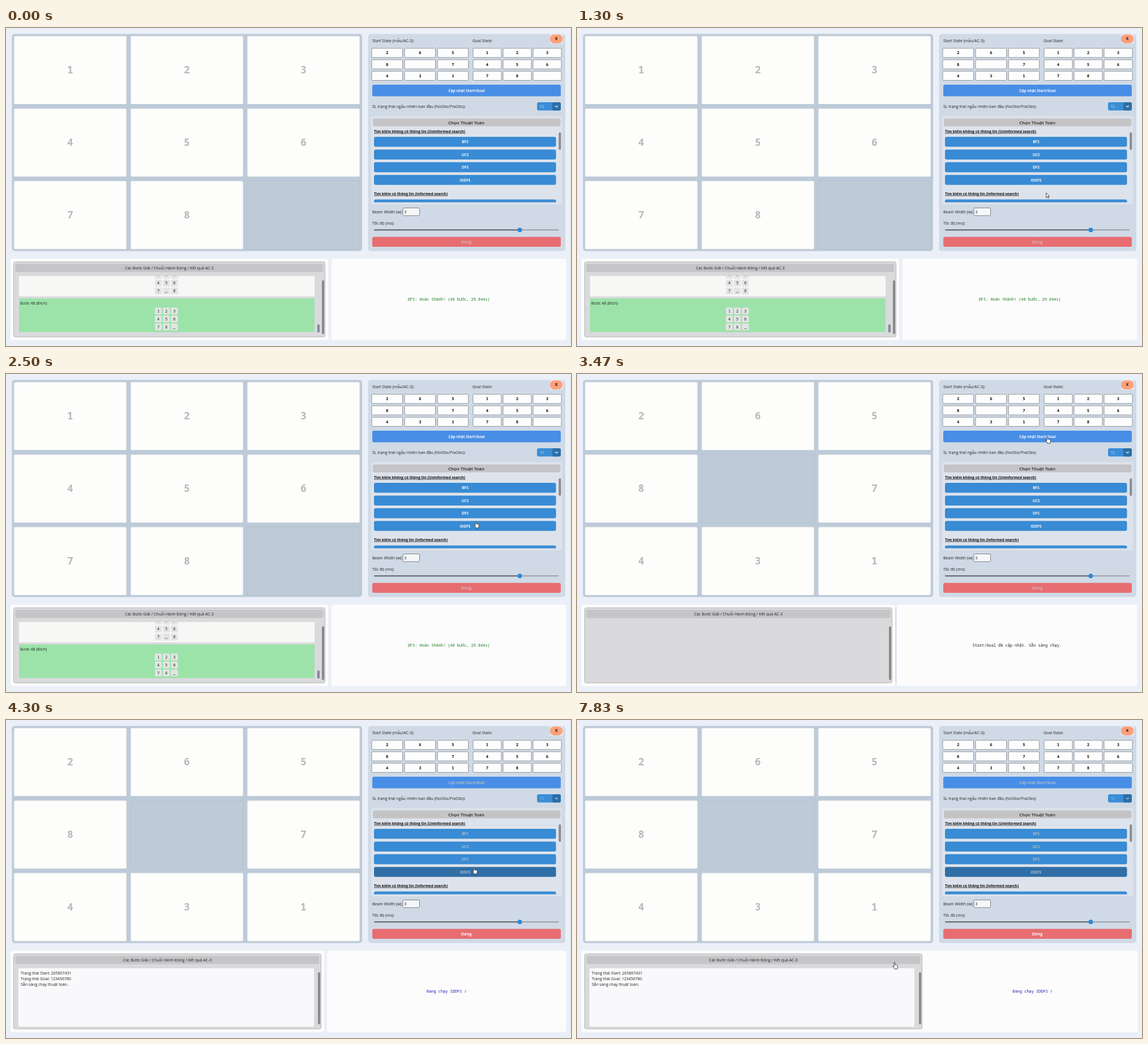
Write an HTML page that moves like this. It is 998 by 561 pixels and loops after 8000 ms.

```html
<!DOCTYPE html>
<html lang="vi">
<head>
<meta charset="utf-8">
<title>8-puzzle</title>
<style>
  html, body { margin: 0; width: 100%; height: 100%; overflow: hidden; background: #ebf0f8; }
  svg { display: block; width: 100vw; height: 100vh; }
  text { font-family: "Open Sans", "Noto Sans", sans-serif; white-space: pre; }
  .mono { font-family: "Noto Sans Mono", "DejaVu Sans Mono", monospace; }
</style>
</head>
<body>
<svg id="stage" viewBox="0 0 998 561"></svg>
<script>
const LOOP = 8000;
const stage = document.getElementById('stage');

function add(parent, tag, attrs, content) {
  const el = document.createElementNS('http://www.w3.org/2000/svg', tag);
  for (const k in attrs) el.setAttribute(k, attrs[k]);
  if (content !== undefined) el.textContent = content;
  return parent.appendChild(el);
}
const group = (parent = stage) => add(parent, 'g', {});

// Rectangle from its left, top, right and bottom edges
const box = (g, l, t, r, b, fill, rx = 0, stroke = 'none') =>
  add(g, 'rect', { x: l, y: t, width: r - l, height: b - t, fill, rx, stroke });

// Text whose capitals are centred on y
const text = (g, s, x, y, size = 7, more = {}) =>
  add(g, 'text', { x, y: y + size * 0.357, 'font-size': size, fill: '#222', ...more }, s);
const MID = { 'text-anchor': 'middle' };
const BOLD = { 'font-weight': 700 };
const MONO = { class: 'mono' };

function board(digits) {
  const g = group();
  [...digits].forEach((d, i) => {
    const x = 14 + i % 3 * 206, y = 14 + Math.floor(i / 3) * 127.9;
    const blank = d === '0';
    box(g, x, y, x + 199, y + 120.5, blank ? '#becbd7' : '#fdfdfc', 2, blank ? '#b5c3cb' : '#c9d0d5');
    if (!blank) text(g, d, x + 99.5, y + 60, 18, { ...MID, ...BOLD, ...MONO, fill: '#b9b9b9' });
  });
  return g;
}

function inputs(digits, left, pitch, width) {
  [...digits].forEach((d, i) => {
    const x = left + i % 3 * pitch, y = 35.8 + Math.floor(i / 3) * 20.2;
    box(stage, x, y, x + width, y + 16.2, '#fdfdfd', 1, '#8d949b');
    if (d !== '0') text(stage, d, x + width / 2, y + 8, 7.3, { ...MID, ...BOLD, ...MONO, fill: '#111' });
  });
}

function miniGrid(g, rows, top) {
  rows.forEach((row, r) => [...row].forEach((d, c) => {
    const x = 269 + c * 14.2, y = top + r * 14;
    box(g, x - 6, y - 6, x + 6, y + 6, '#e3e4e5', 1);
    text(g, d, x, y, 7, { ...MID, ...MONO });
  }));
}

// Lower area: results frame ending at `edge`, status card from `cardX`
function lower(edge, cardX, cardEnd, barEnd, status, color) {
  const g = group();
  box(g, 8, 407, edge + 5, 550.5, '#fcfcfc', 3);
  box(g, cardX, 407, cardEnd, 550.5, '#fcfcfc', 3);
  box(g, 13.5, 412.5, edge - .5, 545, '#dadadc', 3, '#b6b6ba');
  box(g, 16.5, 416, edge - 3.5, 430.5, '#c5c5c8', 3);
  text(g, 'Các Bước Giải / Chuỗi Hành Động / Kết quả AC-3', (13 + edge) / 2, 423.3, 7, MID);
  box(g, edge - 6, 445, edge - 2, barEnd, '#888', 2);
  text(g, status, (cardX + cardEnd) / 2, 478.6, 6.92, { ...MID, ...MONO, fill: color });
  return g;
}

function log(g, right) {
  box(g, 22, 438, right, 541, '#f9f9fb', 2);
  ['Trạng thái Start: 265807431', 'Trạng thái Goal: 123456780', 'Sẵn sàng chạy thuật toán.']
    .forEach((s, i) => text(g, s, 26, 446.5 + i * 9.8));
}

// Board
box(stage, 10.5, 10.5, 629, 393.5, '#bccad9', 5);
const solved = board('123456780');
const shuffled = board('265807431');

// Control panel
box(stage, 639.5, 10.5, 988, 393.5, '#d0dae6', 5);
text(stage, 'Start State (mẫu/AC-3):', 647, 23);
text(stage, 'Goal State:', 824, 23);
box(stage, 961, 11, 983.5, 27.5, '#e6ebf1', 1);
box(stage, 961, 11.5, 983, 27, '#ffa079', 7);
text(stage, 'X', 972, 19, 7, { ...MID, ...BOLD, fill: '#111' });
inputs('265807431', 646, 58.1, 54.5);
inputs('123456780', 825, 53, 50);

const labels = [];
const label = (s, x, y) => labels.push(text(stage, s, x, y, 6.5, { ...MID, ...BOLD }));

box(stage, 647, 100, 980, 120.5, '#488ee6', 3);
label('Cập nhật Start/Goal', 813.5, 110.3);
text(stage, 'SL trạng thái ngẫu nhiên ban đầu (NoObs/PraObs):', 647, 138.3);
box(stage, 938, 131, 980, 145.5, '#3a8dd6', 3);
box(stage, 965, 131, 980, 145.5, '#2d6ea6', 3);
const count = text(stage, '10', 942, 138.3);
const chevron = add(stage, 'path', { d: 'M970 137.3l2.5 2.2 2.5-2.2', fill: 'none', 'stroke-width': 1.2 });

box(stage, 645, 155.5, 982, 311, '#dde3ec', 4);
box(stage, 648, 159.5, 979.5, 173.5, '#c4c4c7', 3);
text(stage, 'Chọn Thuật Toán', 813, 166.8, 7.8, { ...MID, 'font-weight': 600 });
const HEAD = { ...BOLD, fill: '#111', 'text-decoration': 'underline' };
text(stage, 'Tìm kiếm không có thông tin (Uninformed search)', 650, 182.3, 6.5, HEAD);
let picked;
['BFS', 'UCS', 'DFS', 'IDDFS'].forEach((s, i) => {
  const y = 192 + i * 22.4;
  picked = box(stage, 650, y, 971.5, y + 17.6, '#388bd4', 3);
  label(s, 811, y + 9);
});
text(stage, 'Tìm kiếm có thông tin (Informed search)', 650, 292.3, 6.5, HEAD);
add(stage, 'path', { d: 'M650 307.5v-2q0-3 3-3h315.500q3 0 3 3v2z', fill: '#388bd4' });
box(stage, 976.3, 184, 980.3, 215, '#8a8a8c', 2);

text(stage, 'Beam Width (w):', 647, 324.2);
box(stage, 701, 317.5, 730.5, 331, '#f5f7f9', 1.5, '#7d8287');
text(stage, '3', 703.5, 324.2);
text(stage, 'Tốc độ (ms):', 647, 345);
box(stage, 650, 355.2, 976.5, 357.2, '#9aa0a8', 1);
box(stage, 650, 355.2, 907, 357.2, '#666a6e', 1);
add(stage, 'circle', { cx: 907.5, cy: 356.3, r: 4, fill: '#2f87d2' });
box(stage, 647, 368.5, 980, 386, '#e76d71', 3);
const stop = text(stage, 'Dừng', 813, 377.4, 6.8, { ...MID, ...BOLD });

// Lower area in its successive states
const done = lower(564, 575, 989.5, 540, 'DFS: Hoàn thành! (48 bước, 29.844s)', '#17791b');
const clip = add(stage, 'clipPath', { id: 'list' });
box(clip, 22, 437.5, 546, 540);
const list = add(done, 'g', { 'clip-path': 'url(#list)' });
box(list, 23, 430, 545, 473.5, '#f7f7f6');
miniGrid(list, ['123', '456', '7_8'], 436);
box(list, 23, 477, 545, 536.5, '#9ce3aa');
text(list, 'Bước 48 (Đích)', 25, 485.3);
miniGrid(list, ['123', '456', '78_'], 499.3);
box(done, 549.8, 523, 554, 537, '#8787a0', 1.5);

const READY = 'Start/Goal đã cập nhật. Sẵn sàng chạy.';
const BUSY = 'Đang chạy IDDFS /';
const cleared = lower(557, 565, 989.5, 540, READY, '#222');
box(cleared, 562.5, 412, 564, 545, '#d4d4e4', 1);
const ready = lower(557, 567, 989.5, 537, READY, '#222');
log(ready, 544);
const busy = lower(557, 567, 989.5, 537, BUSY, '#1a1ab4');
log(busy, 544);
const wide = lower(610, 619, 990.5, 537, BUSY, '#1a1ab4');
box(wide, 610, 407, 622, 550.5, '#fcfcfc');
log(wide, 596);

// Pointer, hot spot at the origin
const cursor = group();
const INK = { fill: '#fff', stroke: '#222', 'stroke-width': .8, 'stroke-linejoin': 'round' };
const arrow = add(cursor, 'path', { d: 'M0 0v8.500l2-1.800 1.300 2.900 1.400-.6-1.300-2.800h2.600z', ...INK });
const hand = add(cursor, 'path', {
  d: 'M-1 .8q0-1 .9-1t.9 1v3.600q2.500-.1 4 .9 .9.500.7 2.200l-.7 2.800v1.500h-5v-1.300l-2.800-3.200q-.5-1.100.6-1.100l1.400 1z', ...INK
});

// Time, x, y
const path = [
  [0, 842, 575], [300, 842, 575], [830, 827.5, 321.8], [1000, 827.5, 321.8],
  [1600, 830, 260], [2500, 830, 260], [3150, 831, 110.5], [3530, 831, 110.5],
  [4070, 827, 260], [4350, 827, 260], [5000, 672, 292], [5400, 672, 292],
  [5600, 558, 425], [6300, 558, 425], [6330, 561, 426], [6970, 561, 426],
  [7300, 561, 428], [7670, 561, 428], [7830, 561, 427.5], [LOOP, 561, 427.5]
];

function pointerAt(t) {
  const i = path.findIndex(p => p[0] > t);
  const [t0, x0, y0] = path[i - 1], [t1, x1, y1] = path[i];
  const u = (t - t0) / (t1 - t0), e = u * u * (3 - 2 * u);
  return [x0 + (x1 - x0) * e, y0 + (y1 - y0) * e];
}

const show = (el, on) => el.setAttribute('visibility', on ? 'visible' : 'hidden');
const paint = (el, color) => el.setAttribute('fill', color);
const CLICK = 3400, LOG = 3570, RUN = 4200, WIDEN = 4450;
const states = [[done, 0, CLICK], [cleared, CLICK, LOG], [ready, LOG, RUN], [busy, RUN, WIDEN], [wide, WIDEN, LOOP]];

function draw(t) {
  const running = t >= RUN;
  show(solved, t < CLICK);
  show(shuffled, t >= CLICK);
  states.forEach(([g, from, to]) => show(g, t >= from && t < to));
  labels.forEach(el => paint(el, running ? '#a9bccf' : '#f6f9fd'));
  paint(picked, running ? '#306ea6' : '#388bd4');
  paint(count, running ? '#93b5d0' : '#b4d2ec');
  chevron.setAttribute('stroke', running ? '#b5c8d8' : '#eef4fa');
  paint(stop, running ? '#fff' : '#d5b1b3');

  const [x, y] = pointerAt(t);
  const onButton = y > 100 && y < 120 || y > 192 && y < 277 && (y - 192) % 22.4 < 17.6;
  cursor.setAttribute('transform', `translate(${x} ${y})`);
  show(hand, running || onButton);
  show(arrow, !running && !onButton);
}

const start = performance.now();
function tick() {
  draw((performance.now() - start) % LOOP);
  requestAnimationFrame(tick);
}
tick();
</script>
</body>
</html>
```
